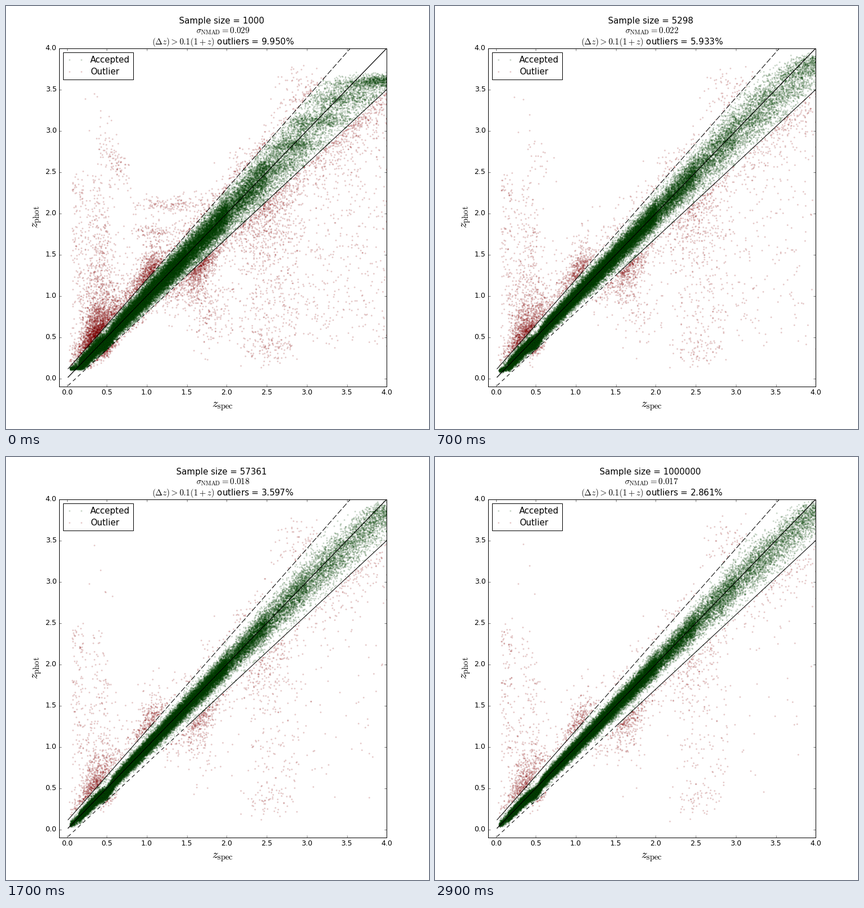
A matplotlib script for the animation above (3 s loop, 748 by 748 pixels).

```python
import numpy as np
import matplotlib.pyplot as plt
from matplotlib.animation import FuncAnimation

SIZE, DPI = 748, 72      # at 72 dpi one point is one pixel
FRAMES, INTERVAL = 30, 100

plt.rcParams.update({
    "font.family": "DejaVu Sans",
    "mathtext.fontset": "cm",
    "axes.linewidth": 1,
    "xtick.direction": "in", "ytick.direction": "in",
    "xtick.top": True, "ytick.right": True,
})

rng = np.random.default_rng(7)

# How the fit improves while the sample grows
KEYS = [0, 5, 9, 13, 17, 21, 29]
OUTLIERS = [9.950, 6.557, 5.369, 4.063, 3.597, 3.249, 2.861]
SIGMA = [0.029, 0.023, 0.021, 0.019, 0.018, 0.018, 0.017]


def along(i, values):
    return np.exp(np.interp(i, KEYS, np.log(values)))


# Main relation: true redshifts and the fixed part of their scatter
N = 42000
TRUE_Z = np.interp(
    rng.random(N),
    [0, 0.012, 0.18, 0.39, 0.61, 0.78, 0.875, 0.93, 0.967, 1],
    [0.04, 0.15, 0.5, 1, 1.5, 2, 2.5, 3, 3.5, 4.05])
FIXED = rng.normal(size=N)


def step(x, centre, rate):
    return 1 / (1 + np.exp(-(x - centre) * rate))


def soft_max(y, low, s):
    return low + s * np.logaddexp(0, (y - low) / s)


def soft_min(y, high, s):
    return high - s * np.logaddexp(0, (high - y) / s)


def main_relation(i, noise):
    x = TRUE_Z
    n = 0.8 * FIXED + 0.6 * noise.normal(size=N)
    spread = along(i, SIGMA) * (1.3 + 0.5 * step(x, 2.4, 4)) * (1 + x)
    y = x + spread * n
    y -= 0.05 * np.exp(-((x - 0.5) / 0.07) ** 2) + 0.1 * step(x, 3.35, 6)
    # preferred levels at high redshift, strongest for small samples
    pull = (0.004 + 0.026 * np.exp(-i / 6)) * step(y, 2.65, 12)
    y += pull * np.sin(2 * np.pi * (y - 2.685 - 0.004 * i) / 0.29)
    cap = np.interp(i, [0, 5, 9, 13, 29], [3.63, 3.87, 3.9, 3.94, 3.95])
    floor = np.interp(i, [0, 9, 13, 17, 29], [0.12, 0.09, 0.07, 0.04, 0.03])
    y = soft_max(soft_min(y, cap, 0.12), floor, 0.02)
    blur = 0.01 + 0.022 * step(y, 2.6, 12)
    return x, y + blur * noise.normal(size=N)


# Outlier groups: first count, last count, decay power, x, y
groups = []


def add(first, last, x, y, power=1):
    groups.append((first, last, power, x, y))


def blob(first, last, cx, cy, sx, sy, slope=0, power=1):
    x = rng.normal(cx, sx, max(first, last))
    add(first, last, x, rng.normal(cy + slope * (x - cx), sy), power)


def box(first, last, x0, x1, y0, y1):
    n = max(first, last)
    add(first, last, rng.uniform(x0, x1, n), rng.uniform(y0, y1, n))


def beyond(first, last, x, side, scale):
    y = x + side * (0.1 * (1 + x) + rng.exponential(scale, len(x)))
    add(first, last, x, y)


def column(n, centre, width):
    return np.abs(rng.normal(centre, width, n)) + 0.03


beyond(1400, 480, column(1400, 0.31, 0.12), 1, 0.12)
beyond(900, 130, column(900, 0.36, 0.11), 1, 0.5)
box(150, 120, 0.05, 0.55, 0.5, 2.4)
box(70, 75, 0.07, 0.2, 0.9, 2.6)
beyond(480, 60, rng.uniform(0.5, 1.1, 480), 1, 0.13)
beyond(200, 70, rng.uniform(1.1, 2.5, 200), 1, 0.09)
beyond(320, 110, rng.uniform(1.2, 2.7, 320), -1, 0.1)
beyond(50, 40, rng.uniform(0.42, 0.62, 50), -1, 0.03)
beyond(520, 250, rng.normal(1.03, 0.09, 520), 1, 0.11)
beyond(620, 290, rng.normal(1.67, 0.12, 620), -1, 0.13)
beyond(480, 140, rng.normal(2.55, 0.2, 480), -1, 0.27)
beyond(300, 110, rng.uniform(3.1, 4.02, 300), -1, 0.25)
blob(110, 90, 2.95, 3.45, 0.18, 0.16)
box(680, 55, 2.0, 4.05, 0.4, 2.8)
box(220, 110, 2.3, 2.9, 0.2, 1.8)
blob(80, 45, 2.5, 0.36, 0.14, 0.1)
blob(170, 4, 1.8, 0.85, 0.12, 0.25)
blob(100, 0, 0.6, 2.65, 0.1, 0.16, -1.2, power=2)
blob(150, 0, 1.25, 2.11, 0.25, 0.05, power=4)
blob(90, 0, 1.1, 1.78, 0.15, 0.05, power=4)


def stray_points(i, noise):
    w = (along(i, OUTLIERS) - OUTLIERS[-1]) / (OUTLIERS[0] - OUTLIERS[-1])
    xs, ys = [], []
    for first, last, power, x, y in groups:
        n = round(last + (first - last) * w ** power)
        xs.append(x[:n])
        ys.append(y[:n] + noise.normal(0, 0.03, n))
    return np.concatenate(xs), np.concatenate(ys)


def cloud(i):
    noise = np.random.default_rng(100 + i)
    x, y = np.hstack([main_relation(i, noise), stray_points(i, noise)])
    keep = (y > 0.03) & (x > 0.02)
    x, y = x[keep], y[keep]
    return x, y, np.abs(y - x) > 0.1 * (1 + x)


fig = plt.figure(figsize=(SIZE / DPI, SIZE / DPI), dpi=DPI, facecolor="w")
ax = fig.add_axes([0.125, 0.1, 0.775, 0.8])
ax.set(xlim=(-0.1, 4), ylim=(-0.1, 4))
ticks = np.arange(0, 4.1, 0.5)
ax.set_xticks(ticks)
ax.set_yticks(ticks)
ax.tick_params(length=4.17, width=0.52, pad=4, labelsize=12.5)
plt.setp(ax.get_yticklabels(), va="center")


def dots(color, label):
    return ax.plot([], [], "o", color=color, mec="k", ms=2.08, mew=0.52,
                   alpha=0.2, label=label, zorder=2)[0]


accepted = dots((0, 0.5, 0), "Accepted")
outlier = dots((1, 0, 0), "Outlier")


def guide(x0, x1, side, style="-", width=1.04):
    x = np.array([x0, x1])
    ax.plot(x, x + side * 0.1 * (1 + x), color="k", ls=style, lw=width,
            dash_capstyle="butt", zorder=3)


guide(0.015, 4, 0, width=1.25)
guide(0.015, 1.05, 1)
guide(1.05, 3.6, 1, (0, (9.5, 3.5)))
guide(0.015, 1.5, -1, (0, (6.2, 5.2)))
guide(1.5, 4, -1)

legend = ax.legend(loc="upper left", numpoints=2, fontsize=15, fancybox=False,
                   framealpha=1, edgecolor="k", borderpad=0.4,
                   labelspacing=0.38, handlelength=2, handletextpad=0.8,
                   borderaxespad=0.5)
legend.get_frame().set_linewidth(1)


def put(x, baseline, text, size=15, **kw):
    return fig.text(x / SIZE, 1 - baseline / SIZE, text, fontsize=size,
                    ha="center", va="baseline", **kw)


size_text = put(381, 31, "")
sigma_text = put(383.4, 48.5, "")
outlier_text = put(383.6, 67.5, "")
put(383.4, 709, r"$z_{\rm spec}$", 20.8)
put(56, 373.5, r"$z_{\rm phot}$", 20.8, rotation=90, rotation_mode="anchor")


def update(i):
    x, y, out = cloud(i)
    accepted.set_data(x[~out], y[~out])
    outlier.set_data(x[out], y[out])
    count = int(1000 * 10 ** (3 * i / (FRAMES - 1)) + 1e-6)
    size_text.set_text(f"Sample size = {count}")
    sigma_text.set_text(rf"$\sigma_{{\rm NMAD}} = {along(i, SIGMA):.3f}$")
    outlier_text.set_text(
        rf"$(\Delta z) > 0.1(1+z)$ outliers = {along(i, OUTLIERS):.3f}%")
    return accepted, outlier, size_text, sigma_text, outlier_text


anim = FuncAnimation(fig, update, frames=FRAMES, interval=INTERVAL,
                     repeat=True, repeat_delay=0, blit=False)
plt.show()
```
